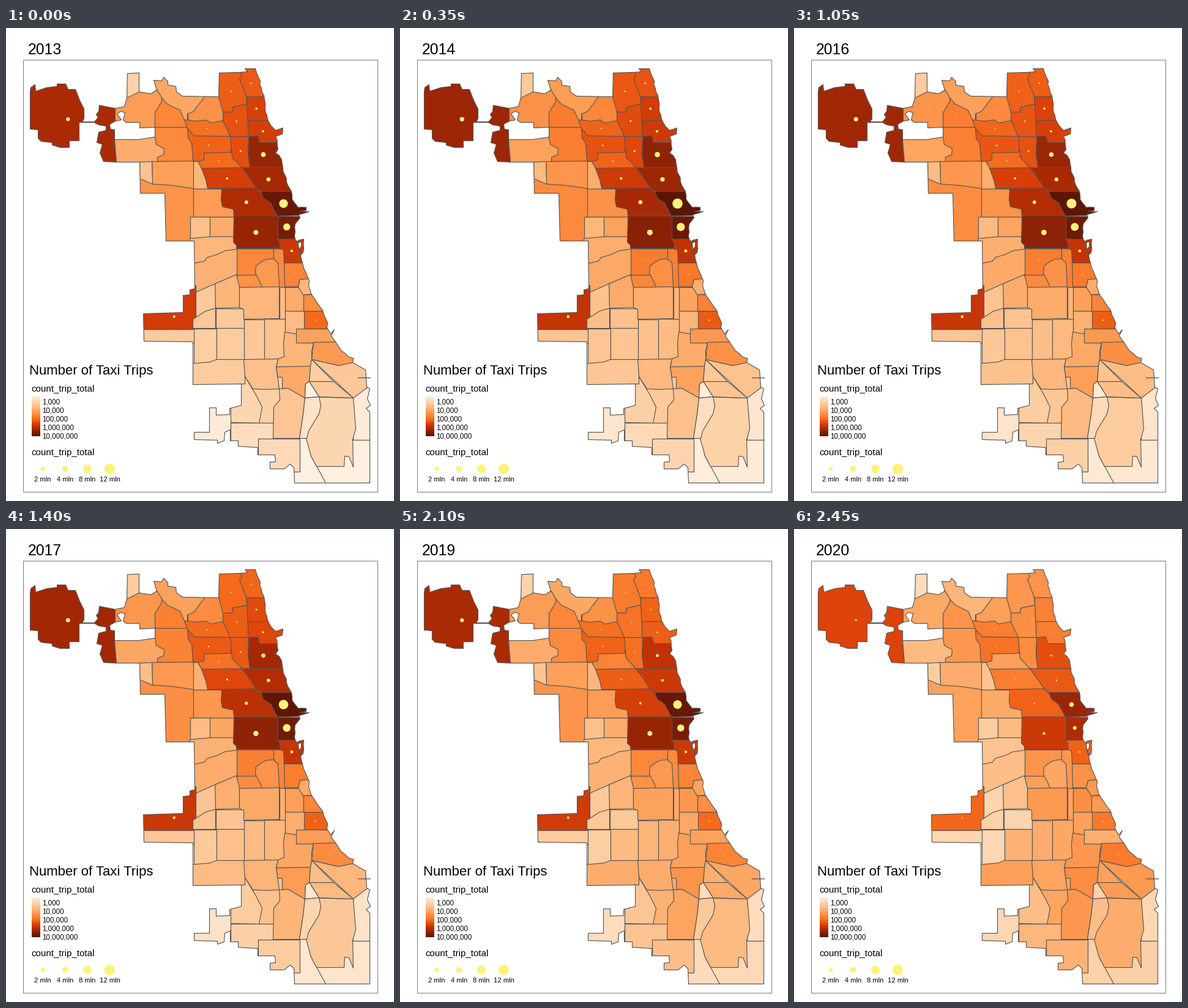
A matplotlib script that plays this animation: 634 px wide and 774 px high, repeating every 2800 ms.

```python
import numpy as np
import matplotlib.pyplot as plt
from matplotlib.animation import FuncAnimation
from matplotlib.colors import LinearSegmentedColormap
from matplotlib.patches import Circle, Polygon, Rectangle
from matplotlib.path import Path

W, H, DPI = 634, 774, 64
PX = 72 / DPI  # points per pixel
FIRST, LAST = 2013, 2020
LINE, DOT = "#565656", "#fff27a"
rng = np.random.default_rng(4)

heat = LinearSegmentedColormap.from_list("heat", [
    "#fff3e6", "#fee4cc", "#fcd2a9", "#fdbc85", "#fda25d", "#fc873a",
    "#f56a1c", "#dc420a", "#b42c04", "#842006", "#5c1504"], N=512)

plt.rcParams["font.family"] = "Liberation Sans"
fig = plt.figure(figsize=(W / DPI, H / DPI), dpi=DPI, facecolor="white")
ax = fig.add_axes((0, 0, 1, 1))
ax.axis("off")


def points(*xy):
    return np.array(xy, float).reshape(-1, 2)


def rough(pts, step=6, amp=0.8):
    """Break long shore segments into small seeded wiggles."""
    out = []
    for a, b in zip(pts[:-1], pts[1:]):
        n = max(1, int(np.hypot(*(b - a)) / step))
        for k in range(n):
            jitter = rng.normal(0, amp, 2) if k else 0
            out.append(a + (b - a) * k / n + jitter)
    return np.array(out)


def outline(pts, **style):
    shape = Polygon(pts, ec=LINE, lw=1.15 * PX, joinstyle="round", **style)
    return ax.add_patch(shape)


def dot_radius(mln):
    return 2.48 * np.sqrt(mln)


def trips(level):
    """Trips in millions for a level (0-100) on the log colour scale."""
    return 10 ** ((level / 100 - 0.12) / 0.2175 - 3)


def text(x, y, s, size, ha="left"):
    return ax.text(x, y, s, fontsize=size * PX, ha=ha, va="baseline",
                   color="black", zorder=6)


# the city limits: districts are painted over each other and clipped to them
north_edge = points(
    198, 74, 217, 73, 217, 104, 236, 107, 246, 101, 241, 85, 254, 86, 257, 80,
    264, 87, 264, 93, 277, 95, 278, 104, 288, 111, 347, 112, 348, 73, 382, 72,
    394, 71, 390, 66)
shore = rough(points(
    407, 66, 412, 80, 421, 110, 427, 149, 433, 160, 440, 167, 452, 163,
    451, 173, 440, 177, 444, 198, 440, 204, 450, 215, 452, 228, 460, 257,
    466, 267, 467, 280, 477, 293, 490, 293, 490, 298, 479, 300, 495, 300,
    478, 305, 480, 310, 472, 320, 472, 345, 476, 350, 477, 347, 486, 345,
    485, 367, 481, 371, 479, 361, 482, 357, 482, 349, 477, 351, 478, 362,
    484, 384, 492, 406, 498, 434, 517, 461, 525, 482, 524, 490, 530, 500,
    536, 493, 531, 503, 538, 513, 547, 527, 560, 538, 573, 542))
south_edge = points(
    566, 547, 587, 559, 589, 587, 594, 590, 590, 606, 595, 617, 588, 622,
    594, 628, 594, 744, 471, 744, 470, 719, 464, 713, 454, 721, 431, 721,
    431, 710, 440, 709, 439, 698, 411, 698, 411, 686, 379, 684, 379, 675,
    366, 675, 366, 657, 357, 661, 356, 675, 345, 679, 345, 674, 307, 673,
    307, 661, 332, 661, 332, 621, 343, 621, 343, 633, 365, 632, 365, 622,
    384, 617, 384, 582, 305, 583, 305, 513)
west_edge = points(
    225, 512, 224, 467, 289, 465, 289, 437, 300, 436, 300, 428, 308, 426,
    307, 348, 261, 348, 259, 270, 219, 270, 218, 219, 180, 219, 177, 182,
    216, 182, 243, 178, 243, 162, 218, 163, 218, 154, 196, 154, 191, 150,
    194, 138, 187, 136, 181, 140, 188, 150, 178, 152, 178, 131, 193, 128,
    197, 114)
limits = np.concatenate([north_edge, shore, south_edge, west_edge])
city = outline(limits, fill=False, zorder=4)

gx, gy = np.meshgrid(np.arange(0, W, 2), np.arange(0, H, 2))
grid = np.column_stack([gx.ravel(), gy.ravel()])
land = Path(limits).contains_points(grid)
owner = np.full(len(grid), -1)
districts = []


def region(rise, drift, shock):
    """Districts sharing one trend: a first-year rise, a drift, a last-year jump."""
    def district(base, *xy, clip=True):
        if len(xy) == 4:
            x0, y0, x1, y1 = xy
            xy = x0, y0, x1, y0, x1, y1, x0, y1
        pts = points(*xy)
        shape = outline(pts, zorder=2)
        if clip:
            shape.set_clip_path(city)
        inside = Path(pts).contains_points(grid)
        owner[inside & land if clip else inside] = len(districts)

        def level(t):
            slow = drift * (min(t, 6) / 6) ** 2
            return min(100, base + rise * min(t, 1) + slow + shock * (t >= 7))

        districts.append((shape, level))
    return district


core = region(3, -3, -12)
lake = region(2, -11, -10)
west = region(4, -4, -5)
south = region(3, 5, 3)
far = region(2, 11, 5)

# airport field
core(82, 39, 104, 40, 97, 47, 92, 48, 103, 66, 97, 83, 95, 83, 91, 97, 91,
     101, 100, 113, 100, 120, 118, 127, 132, 127, 148, 124, 153, 144, 153,
     150, 146, 147, 141, 151, 136, 152, 126, 178, 131, 178, 152, 169, 157,
     170, 165, 177, 166, 177, 192, 180, 219, 159, 218, 153, 204, 157, 190,
     148, 187, 151, 170, 163, 167, 163, 160, 151, 158, 144, 154, 119, 154,
     119, 184, 103, 184, 103, 195, 88, 195, 75, 191, 75, 187, 57, 185,
     52, 180, 52, 166, 39, 165, clip=False)

# north-west
west(20, 190, 70, 217, 125)
west(42, 170, 125, 197, 114, 217, 104, 270, 100, 270, 163, 170, 163)
west(50, 243, 163, 243, 138, 254, 120, 254, 105, 300, 105, 300, 164)
west(46, 296, 105, 356, 160)
west(38, 247, 102, 230, 75, 330, 75, 324, 112, 306, 136, 296, 140, 296, 150,
     291, 150, 284, 134, 263, 124, 255, 115)
west(36, 170, 170, 258, 219)
west(49, 243, 162, 310, 162, 310, 218, 247, 218, 247, 211, 257, 207, 258, 197,
     245, 190, 243, 178)
west(45, 210, 230, 330, 350)
west(41, 238, 218, 330, 217, 330, 262, 305, 262, 270, 257, 239, 255)
west(27, 218, 219, 238, 218, 239, 255, 218, 246)
west(32, 305, 217, 335, 262)
lake(60, 313, 200, 366, 200, 385, 229, 319, 229, 313, 218)
west(58, 291, 150, 296, 150, 310, 152, 327, 150, 334, 155, 354, 151, 370, 177,
     307, 177, 296, 164)
west(62, 296, 164, 307, 176, 375, 177, 366, 203, 323, 204, 323, 215, 313, 218,
     305, 217, 303, 188, 297, 180)

# north lakefront
lake(64, 380, 60, 430, 111)
lake(71, 392, 111, 435, 150)
lake(63, 340, 60, 382, 70, 385, 78, 381, 82, 392, 111, 393, 124, 370, 129,
     369, 137, 354, 137, 347, 112)
lake(66, 354, 137, 369, 137, 370, 129, 393, 124, 396, 177, 366, 177, 354, 151)
lake(72, 394, 150, 460, 190)
lake(86, 396, 177, 411, 176, 414, 187, 460, 187, 460, 228, 398, 228, 395, 206)
lake(67, 366, 177, 396, 177, 395, 206, 398, 228, 385, 228, 369, 211)
lake(72, 319, 229, 385, 228, 407, 257, 408, 262, 329, 262, 326, 248)
lake(83, 385, 228, 480, 228, 480, 267, 416, 267, 408, 261, 393, 238)

# centre and west
west(42, 305, 262, 380, 308)
west(28, 300, 308, 332, 350)
west(36, 332, 308, 380, 350)
west(32, 300, 344, 334, 341, 380, 341, 380, 386, 300, 386)
west(24, 300, 400, 341, 476)
west(34, 300, 386, 324, 381, 328, 375, 345, 370, 357, 364, 380, 361, 380, 402,
     341, 418, 305, 434)
west(50, 376, 360, 447, 404)
west(46, 376, 403, 420, 424)
west(49, 436, 360, 455, 423)
west(43, 436, 377, 444, 384, 446, 423, 418, 424, 414, 414, 407, 401, 408, 389,
     417, 382, 425, 378)
lake(81, 352, 262, 408, 261, 424, 276, 445, 307, 372, 307, 371, 296, 353, 292,
     351, 281)
core(86, 372, 307, 447, 307, 447, 360, 376, 360, 376, 355, 371, 350)
core(93, 443, 307, 500, 345)
core(97, 416, 267, 500, 267, 500, 306, 443, 307, 437, 296, 432, 286, 420, 278)
core(74, 443, 345, 500, 345, 500, 384, 454, 384, 453, 363, 447, 360, 447, 350)

# south-west
core(73, 220, 420, 309, 492)
west(23, 220, 492, 309, 515)
west(25, 305, 476, 325, 463, 342, 458, 342, 491, 305, 491)
west(33, 341, 418, 376, 403, 381, 424, 381, 457, 342, 458)
west(24, 342, 458, 388, 490)
south(32, 381, 424, 446, 423, 446, 475, 388, 476, 388, 460, 381, 457)
west(22, 306, 491, 343, 560)
south(23, 343, 490, 388, 542)
south(25, 388, 476, 421, 542)
south(27, 421, 475, 455, 541)
far(23, 300, 549, 333, 546, 343, 542, 390, 542, 390, 590, 300, 590)

# south lakefront
west(51, 454, 384, 500, 384, 500, 411, 480, 411, 477, 423, 455, 423)
south(29, 446, 423, 455, 475)
south(36, 455, 423, 485, 462)
south(32, 480, 411, 520, 408, 520, 434, 485, 436, 477, 423)
west(48, 485, 435, 530, 462)
west(60, 485, 462, 540, 491)
south(30, 455, 462, 486, 500)
south(33, 455, 497, 473, 500, 502, 514, 499, 528, 499, 542, 497, 554,
      441, 554, 444, 541, 454, 537, 453, 515)
west(40, 473, 491, 545, 514)
south(43, 502, 514, 545, 513, 590, 540, 575, 555, 543, 552, 499, 542)

# far south
south(6, 566, 575, 610, 673)
far(3, 500, 673, 600, 750)
far(2, 460, 671, 491, 671, 498, 700, 522, 744, 522, 750, 460, 750)
far(18, 490, 603, 567, 605, 571, 655, 566, 673, 567, 718, 560, 701, 553, 700,
    552, 717, 507, 717, 498, 700, 490, 671)
far(25, 499, 542, 543, 552, 566, 547, 600, 545, 600, 580, 567, 605)
far(24, 495, 578, 535, 578, 567, 605, 511, 603)
far(22, 499, 542, 535, 578, 495, 578, 497, 553)
south(37, 441, 554, 497, 553, 495, 578, 489, 582, 488, 605, 471, 598,
      460, 589, 446, 590)
far(2, 489, 582, 495, 578, 511, 603, 488, 605)
far(21, 390, 570, 450, 646)
south(28, 388, 542, 444, 541, 441, 554, 446, 590, 423, 591, 403, 590, 390, 570)
south(18, 375, 582, 390, 582, 390, 570, 408, 600, 418, 620, 413, 646, 360, 645)
south(6, 300, 615, 366, 680)
far(14, 366, 645, 437, 690)
far(16, 411, 671, 479, 725)
far(26, 446, 590, 460, 589, 488, 605, 485, 632, 479, 671, 436, 671, 437, 620,
    447, 608)
far(11, 488, 605, 511, 603, 514, 617, 511, 631, 494, 659, 491, 671, 479, 671,
    485, 632)
ax.plot([574, 594], [571, 571], color=LINE, lw=1.3 * PX, zorder=4)

# each dot sits at the middle of what is left visible of its district
dots = [ax.add_patch(Circle(grid[owner == k].mean(axis=0), 1, fc=DOT, lw=0,
                            zorder=5)) for k in range(len(districts))]

# frame, title and legends
ax.add_patch(Rectangle((27, 51), 579, 707, fill=False, ec="#7a7a7a", lw=PX))
year = text(35, 42.5, str(FIRST), 24.8)
text(38, 566, "Number of Taxi Trips", 22.1)
for y in (595, 699):
    text(40.5, y, "count_trip_total", 15.1)

ax.imshow(np.linspace(0.06, 1, 256)[:, None], cmap=heat, vmin=0, vmax=1,
          extent=(41.5, 55.5, 667.5, 602.5), aspect="auto", zorder=3)
for i in range(5):
    text(59, 615 + 14 * i, f"{10 ** (3 + i):,}", 11.5)
for x, n in zip((59.5, 96, 132.5, 169), (2, 4, 8, 12)):
    ax.add_patch(Circle((x, 721), dot_radius(n), fc=DOT, lw=0, zorder=4))
    text(x, 741, f"{n} mln", 11.2, ha="center")
ax.set_xlim(-0.5, W - 0.5)
ax.set_ylim(H - 0.5, -0.5)


def update(t):
    year.set_text(str(FIRST + t))
    for (shape, level), dot in zip(districts, dots):
        value = level(t)
        shape.set_facecolor(heat(value / 100))
        dot.set_radius(dot_radius(trips(value)))
    return [year]


anim = FuncAnimation(fig, update, frames=LAST - FIRST + 1, interval=350,
                     init_func=lambda: update(0), repeat=True, repeat_delay=0)
plt.show()
```
